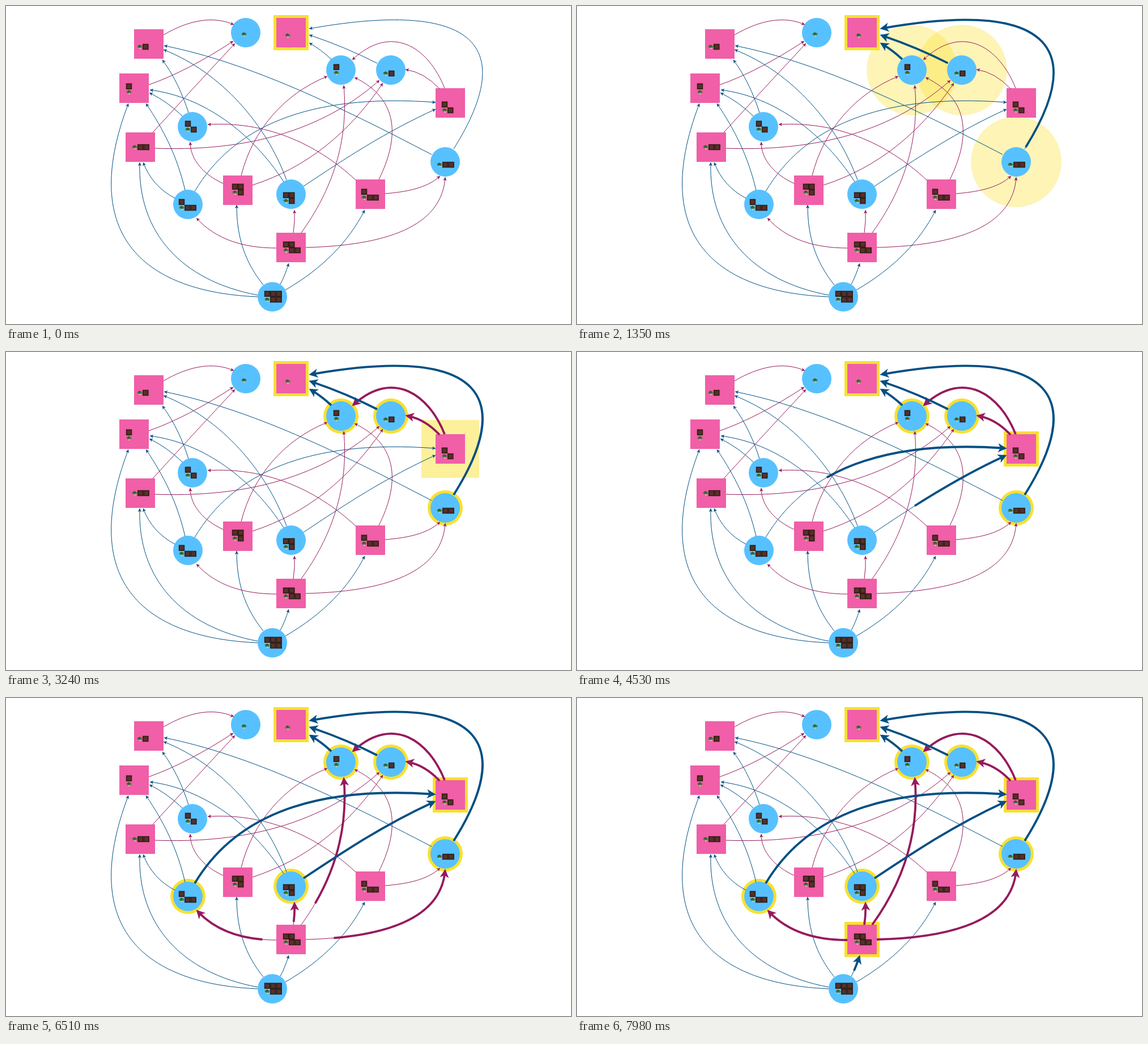
An HTML page for the animation above (8000 ms loop, 997 by 561 pixels).

```html
<!DOCTYPE html>
<html lang="en">
<head>
<meta charset="utf-8">
<title>Game graph</title>
<style>
  html, body { margin: 0; width: 100%; height: 100%; overflow: hidden; background: #fff; }
  svg { display: block; width: 997px; height: 561px; }
  path { fill: none; }
</style>
</head>
<body>
<svg id="stage" viewBox="0 0 997 561"></svg>
<script>
const LOOP = 8000, PINK = '#f05fa8', SKY = '#57c1ff', YELLOW = '#f9e030';
const RING = 31, HALO_EXTRA = 279, HALO_MS = 620, HEAD = 10;

// Each step: edges grow back from their tips, then halos close on the nodes they came from.
const steps = {
  1: { start: 15, lineMs: 1420, halo: 1132 },
  2: { start: 1890, lineMs: 1350, halo: 2942 },
  3: { start: 3750, lineMs: 1310, halo: 4750 },
  4: { start: 5600, lineMs: 1284, halo: 6620 },
  5: { start: 7430, lineMs: 980 }
};

// x, y, sprout x, sprout y, bars above, bars to the right, step (0 = marked from the start)
const squares = [
  [252, 67, 236, 72, 0, 1], [503, 47, 497, 52, 0, 0, 0], [226, 145, 217, 152, 1, 0],
  [784, 171, 774, 184, 1, 1, 2], [237, 249, 227, 249, 0, 2], [409, 325, 404, 329, 2, 1],
  [643, 332, 632, 338, 1, 2], [503, 426, 494, 431, 2, 2, 4]
];
const circles = [
  [423, 47, 420, 50, 0, 0], [591, 113, 583, 118, 1, 0, 1], [679, 113, 670, 119, 0, 1, 1],
  [329, 213, 321, 218, 1, 1], [321, 350, 310, 356, 1, 2, 3], [503, 332, 494, 344, 2, 1, 3],
  [775, 275, 765, 280, 0, 2, 1], [470, 513, 461, 518, 3, 2]
];

const plumEdges = [
  ['M278 51C320 26 365 16 402 33'],
  ['M252 139Q320 115 401 62'],
  ['M259 223Q331 144 404 66'],
  ['M774 145C745 72 680 30 611 95', 2],
  ['M765 146Q738 117 705 112', 2],
  ['M263 251C400 256 545 232 659 131'],
  ['M415 299C435 220 490 155 567 124'],
  ['M435 316C530 285 605 225 665 136'],
  ['M521 400C575 325 605 240 596 140', 4],
  ['M658 306C693 235 696 165 615 126'],
  ['M617 307C545 240 455 203 356 209'],
  ['M383 313C350 298 325 272 325 240'],
  ['M669 331C705 328 742 322 766 300'],
  ['M529 426C690 422 770 380 775 302', 4],
  ['M507 400Q510 380 509 360', 4],
  ['M477 427C420 427 370 412 336 374', 4]
];
const navyEdges = [
  ['M574 94Q556 77 535 65', 1],
  ['M655 101Q598 72 535 51', 1],
  ['M790 252C895 85 850 -16 535 40', 1],
  ['M333 327C400 215 530 153 758 170', 3],
  ['M525 318C600 268 670 222 758 182', 3],
  ['M751 262C590 178 430 100 279 70'],
  ['M322 188C312 157 298 125 276 95'],
  ['M311 194Q284 168 253 153'],
  ['M495 307C460 210 380 117 278 77'],
  ['M490 310C435 225 350 160 254 148'],
  ['M316 325C302 265 278 218 247 172'],
  ['M298 339Q258 318 242 276'],
  ['M444 513C250 505 125 410 216 172'],
  ['M444 510C310 485 232 400 236 276'],
  ['M454 492C420 450 407 405 407 351'],
  ['M484 491Q492 476 499 454', 5],
  ['M493 501C560 462 605 415 633 360']
];

const stage = document.getElementById('stage');
function setAttrs(el, attrs) {
  for (const name in attrs) el.setAttribute(name, attrs[name]);
  return el;
}
function add(parent, tag, attrs = {}) {
  const el = document.createElementNS('http://www.w3.org/2000/svg', tag);
  return parent.appendChild(setAttrs(el, attrs));
}
const haloLayer = add(stage, 'g'), nodeLayer = add(stage, 'g');
const thinLayer = add(stage, 'g'), boldLayer = add(stage, 'g');
const halos = [], bolds = [];

function sizeShape(el, round, x, y, r) {
  setAttrs(el, round ? { cx: x, cy: y, r } : { x: x - r, y: y - r, width: 2 * r, height: 2 * r });
}

function addBar(x, y) {
  add(nodeLayer, 'rect', { x: x - 4.7, y: y - 4.7, width: 9.4, height: 9.4, fill: '#4c2a20', stroke: '#24130f' });
  add(nodeLayer, 'rect', { x: x - 2.6, y: y - 2.6, width: 5.2, height: 5.2, fill: '#56322a' });
}

function addSprout(x, y) {
  add(nodeLayer, 'path', { d: `M${x - 1} ${y}h3l-.5 4h-2z`, style: 'fill:#cfdcae' });
  add(nodeLayer, 'ellipse', { cx: x, cy: y - .6, rx: 4.3, ry: 2.5, fill: '#47763a' });
  add(nodeLayer, 'circle', { cx: x - .5, cy: y - 1.8, r: 1.8, fill: '#2f5a2b' });
}

function addNode(round, [x, y, sx, sy, above, right, step]) {
  const tag = round ? 'circle' : 'rect';
  if (step !== undefined) {
    const el = add(haloLayer, tag, { fill: YELLOW });
    if (step) halos.push({ el, round, x, y, start: steps[step].halo });
    else sizeShape(el, round, x, y, RING);
  }
  sizeShape(add(nodeLayer, tag, { fill: round ? SKY : PINK }), round, x, y, 26);
  const pitch = 10.3;
  addSprout(sx, sy);
  for (let i = 0; i < above; i++) addBar(sx + i * pitch, sy - pitch);
  for (let i = 1; i <= right; i++) addBar(sx + i * pitch, sy);
}

function addArrow(layer, path, color) {
  const length = path.getTotalLength();
  const tip = path.getPointAtLength(length), back = path.getPointAtLength(length - 9);
  const angle = Math.atan2(tip.y - back.y, tip.x - back.x) * 180 / Math.PI;
  const place = `translate(${tip.x} ${tip.y}) rotate(${angle})`;
  const arrow = add(layer, 'polygon', { points: '0,0 -15,-8 -11,0 -15,8', fill: color });
  return { arrow, place, length };
}

function addEdge(color, [d, step]) {
  const thin = add(thinLayer, 'path', { d, stroke: color, 'stroke-width': 1 });
  const small = addArrow(thinLayer, thin, color);
  small.arrow.setAttribute('transform', small.place + ' scale(.4)');
  if (!step) return;
  const path = add(boldLayer, 'path', { d, stroke: color, 'stroke-width': 3.8 });
  bolds.push({ path, ...addArrow(boldLayer, path, color), ...steps[step] });
}

squares.forEach(node => addNode(false, node));
circles.forEach(node => addNode(true, node));
plumEdges.forEach(edge => addEdge('#961a5c', edge));
navyEdges.forEach(edge => addEdge('#004f83', edge));

const clamp = v => Math.min(1, Math.max(0, v));
const easeInOut = p => p < .5 ? 2 * p * p : 1 - 2 * (1 - p) ** 2;

function draw(time) {
  for (const { el, round, x, y, start } of halos) {
    const p = clamp((time - start) / HALO_MS);
    sizeShape(el, round, x, y, RING + HALO_EXTRA * (1 - p) ** 4);
    el.setAttribute('opacity', p);
  }
  for (const { path, arrow, place, length, start, lineMs } of bolds) {
    const age = time - start;
    const shown = HEAD + easeInOut(clamp(age / lineMs)) * (length - HEAD);
    setAttrs(path, {
      visibility: age > 0 ? 'visible' : 'hidden',
      'stroke-dasharray': `0 ${length - shown} ${shown - 7} 2000`
    });
    arrow.setAttribute('transform', `${place} scale(${clamp(age / 60)})`);
  }
}

const began = performance.now();
function tick() {
  draw((performance.now() - began) % LOOP);
  requestAnimationFrame(tick);
}
tick();
</script>
</body>
</html>
```
